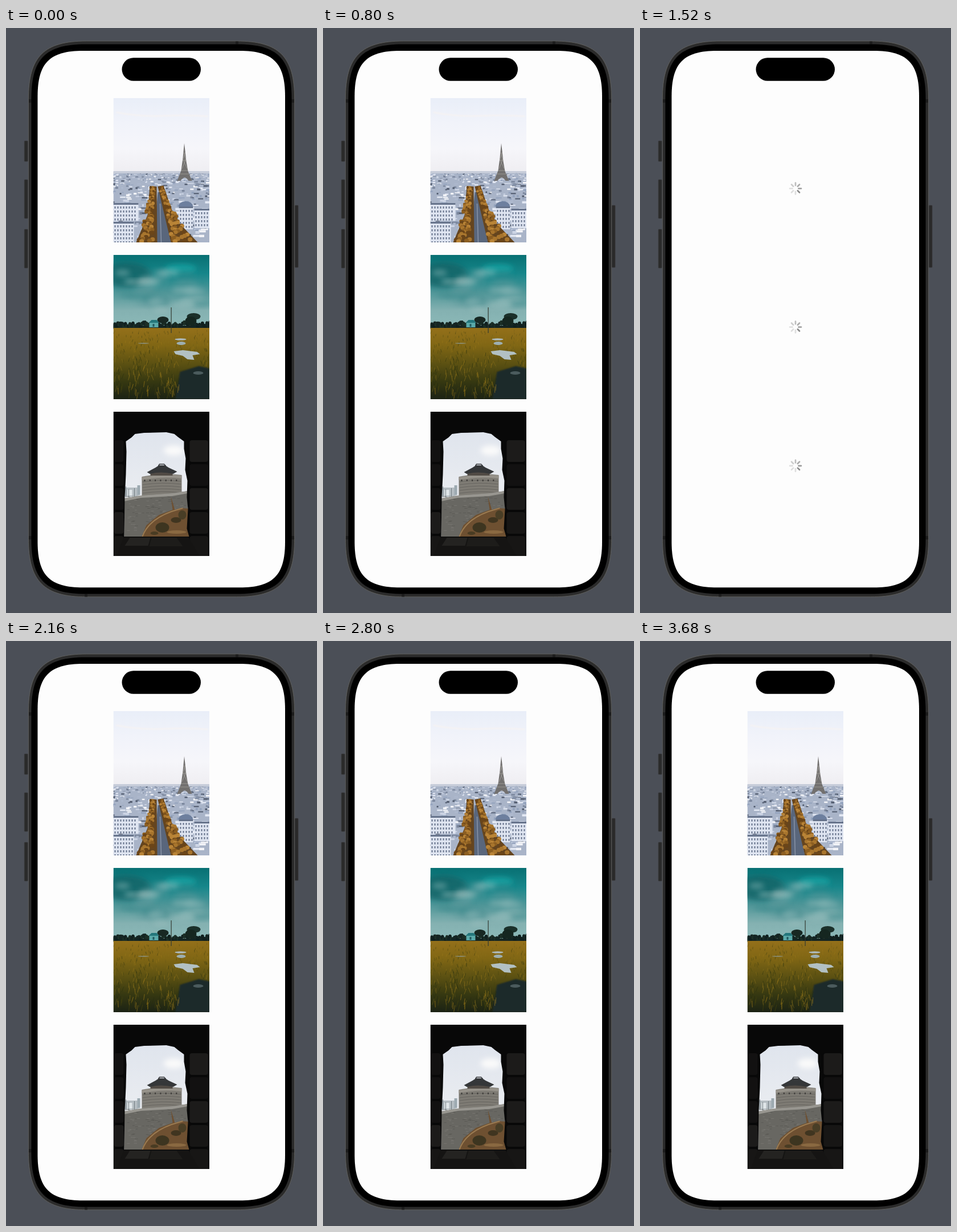
An HTML page for the animation above (3.76 s loop, 546 by 1026 pixels).

```html
<!DOCTYPE html>
<html lang="en">
<head>
<meta charset="utf-8">
<title>Loading photos</title>
<style>
html, body { margin: 0; width: 100%; height: 100%; overflow: hidden; background: #4b4f57; }
svg { display: block; width: 100%; height: 100%; }
</style>
</head>
<body>
<svg id="stage" viewBox="0 0 546 1026">
  <defs>
    <clipPath id="card"><rect width="168.5" height="253"/></clipPath>
    <filter id="soft" x="-50%" y="-50%" width="200%" height="200%"><feGaussianBlur stdDeviation="5"/></filter>
    <filter id="haze" x="-50%" y="-50%" width="200%" height="200%"><feGaussianBlur stdDeviation="1.2"/></filter>
  </defs>
  <rect width="546" height="1026" fill="#4b4f57"/>
  <g id="phone"></g>
  <g id="photos"></g>
  <g id="spinners"></g>
</svg>
<script>
const LOOP = 3760, HIDE = 1200, SHOW = 1840, STEP = 100, SPOKES = 8;
const $ = id => document.getElementById(id);

let seed = 7;
const rnd = (a = 0, b = 1) => {
  seed = (seed * 16807) % 2147483647;
  return a + (b - a) * seed / 2147483647;
};
const pick = list => list[Math.floor(rnd(0, list.length))];
const repeat = (n, make) => Array.from({ length: n }, (_, i) => make(i)).join('');
const rect = (x, y, w, h, fill, more = '') =>
  `<rect x="${x}" y="${y}" width="${w}" height="${h}" fill="${fill}" ${more}/>`;
const path = (d, fill, more = '') => `<path d="${d}" fill="${fill}" ${more}/>`;
const oval = (x, y, rx, ry, fill, more = '') =>
  `<ellipse cx="${x}" cy="${y}" rx="${rx}" ry="${ry}" fill="${fill}" ${more}/>`;
const gradient = (id, ...colors) =>
  `<linearGradient id="${id}" x2="0" y2="1">` + colors.map((c, i) =>
    `<stop offset="${i / (colors.length - 1)}" stop-color="${c}"/>`).join('') + '</linearGradient>';

// Rounded box with smooth, continuous corners
function smoothBox(x, y, w, h, r) {
  const c = r * 0.265, R = x + w, B = y + h;
  return `M${x} ${y + r}C${x} ${y + c} ${x + c} ${y} ${x + r} ${y}H${R - r}` +
    `C${R - c} ${y} ${R} ${y + c} ${R} ${y + r}V${B - r}` +
    `C${R} ${B - c} ${R - c} ${B} ${R - r} ${B}H${x + r}` +
    `C${x + c} ${B} ${x} ${B - c} ${x} ${B - r}Z`;
}

function phone() {
  const button = (x, y, h) => rect(x, y, 6, h, '#2a2a2a', 'rx="1" stroke="#3a3b3d" stroke-width=".7"');
  const band = (x, y, w, h) => rect(x, y, w, h, '#1d1d1d');
  return button(32.3, 198, 36) + button(32.3, 266, 68) + button(32.3, 353, 68) + button(507, 311, 109) +
    path(smoothBox(39.4, 22.9, 467.2, 974.8, 102), '#2b2b2b', 'stroke="#62625f" stroke-width=".9"') +
    band(40, 125, 5, 6) + band(501, 125, 5, 6) + band(40, 891, 5, 6) + band(501, 891, 5, 6) +
    band(403, 23.5, 5, 5) + band(138, 992.5, 5, 5) +
    path(smoothBox(44.5, 28.5, 457, 964, 95), '#000') +
    path(smoothBox(55.5, 40, 434.5, 941.3, 80), '#fdfdfd') +
    rect(203.5, 52.2, 138.5, 40.6, '#000', 'rx="20.3"');
}

function city() {
  const roofs = ['#e4e9f4', '#cdd5e5', '#aeb9ce', '#7b879d', '#535d70', '#f3f4f8', '#94a3bd'];
  const leaves = ['#8c5e21', '#a8752d', '#6b4518', '#b98437'];
  const houses = repeat(520, i => {
    const k = i / 520, y = 131 + 115 * k * k, s = 1 + k * 3;
    return rect(rnd(-5, 168), y + rnd(0, 3), s * rnd(1, 3.6), s * rnd(0.5, 1.5), pick(roofs));
  });
  const trees = (x0, x1, w0, w1) => repeat(90, i => {
    const k = i / 89, w = w0 + (w1 - w0) * k * k;
    return oval(x0 + (x1 - x0) * k + rnd(-w, w), 156 + 95 * k, 2.2 + 2 * k, 2 + 1.8 * k, pick(leaves));
  });
  const block = (x, y, w, h) => rect(x, y, w, h, '#dfe5f1') + rect(x, y, w, 3, '#66738b') +
    repeat(Math.floor(h / 7), r => repeat(Math.floor(w / 5), c =>
      rect(x + 2 + c * 5, y + 6 + r * 7, 2, 3.6, '#64718a')));
  return gradient('citySky', '#e9eef8', '#f1f3fa', '#f6f6fa', '#eeedf1') +
    rect(0, 0, 169, 133, 'url(#citySky)') +
    path('M5 25Q50 33 90 31T166 32', 'none', 'stroke="#f7f3f1" stroke-width="2" filter="url(#haze)"') +
    rect(0, 129, 169, 124, '#a9b4c8') + rect(0, 128, 169, 4, '#c6ccd9') + houses +
    block(0, 184, 44, 31) + block(0, 217, 36, 36) + block(115, 190, 25, 40) + block(142, 194, 27, 34) +
    path('M114 190Q116 181 127 181Q138 181 140 190Z', '#6d7f9e') +
    path('M78 165H83L101 253H70Z', '#59667c') + path('M82 185L84 253', 'none', 'stroke="#8994a7" stroke-width="1.5"') +
    path('M64 154L76 155L77 253H40L60 205Z', '#65451f') + path('M78 155L88 153L107 210L148 253H101Z', '#65451f') +
    trees(69, 56, 4, 14) + trees(83, 121, 3, 19) +
    path('M124.5 79L126 92L128 111L131 128L138 145H132Q125 134 118 145H112L119 127L122 105L123.2 92Z', '#72706f') +
    path('M119 127H131M117 133H133M121.5 109H128M123.5 95L127 108L120.5 124M126 95L122 108L130 124',
      'none', 'stroke="#aaa6a2" stroke-width=".7"');
}

function meadow() {
  const clouds = repeat(24, () => oval(rnd(10, 165), rnd(25, 106), rnd(10, 27), rnd(4, 9),
    pick(['#86b5b5', '#609a9c', '#a4c3c1', '#39878a']), 'opacity=".5" filter="url(#soft)"'));
  const bush = repeat(65, i => oval(i * 2.65, rnd(119, 126), 3, rnd(3, 5), pick(['#142523', '#1b2e26', '#10201f'])));
  const grass = repeat(420, i => {
    const k = i / 420, x = rnd(0, 168), y = 134 + 119 * k;
    if (x > 116 && y > 196) return '';
    return path(`M${x} ${y}l${rnd(-4, 4) * (k + .3)} ${-3 - 9 * k}`, 'none',
      `stroke="${pick(['#8a701b', '#a07c1a', '#44430f', '#29300f', '#64581a'])}" stroke-width="${.6 + .5 * k}" opacity=".65"`);
  });
  return gradient('meadowSky', '#087073', '#16868a', '#4f9698', '#84b1b1', '#8dbab9') +
    gradient('field', '#94701a', '#806614', '#5c5112', '#363811', '#1b2214') +
    rect(0, 0, 169, 130, 'url(#meadowSky)') +
    oval(22, 35, 45, 22, '#176064', 'opacity=".75" filter="url(#soft)"') +
    oval(118, 24, 28, 8, '#13a4a4', 'opacity=".8" filter="url(#soft)"') + clouds +
    rect(0, 124, 169, 6, '#172521') + bush +
    oval(141, 108, 12, 6, '#1b302a') + oval(87, 114, 10, 6, '#182823') + oval(136, 116, 10, 8, '#152620') +
    rect(0, 128, 169, 125, 'url(#field)') +
    path('M63 119L67 115H75L79 119V127H63Z', '#5baaaa') + path('M62 119L67 114H76L80 119Z', '#24777c') +
    rect(69, 121, 3, 5, '#225b61') +
    path('M117 205L150 195L169 199V253H109Z', '#1c292c', 'filter="url(#haze)"') + grass +
    oval(118, 148, 10, 1.8, '#aebabb') + oval(119, 155, 8, 3, '#9daeb0') + oval(53, 155, 10, .8, '#8e9789') +
    path('M106 169L122 167L147 170L152 174L139 176L142 184L130 183L122 177L109 174Z', '#b2c0c3') +
    oval(149, 207, 9, 3, '#6b7d81', 'opacity=".6"') +
    rect(101, 92, 1.2, 45, '#343b31');
}

function gate() {
  const masonry = repeat(140, () => {
    const x = rnd(22, 128), y = rnd(147, 212);
    return rect(x, y, rnd(3, 6), .7, pick(['#494845', '#8b8984']), 'opacity=".6"');
  });
  const stones = (x, w) => repeat(5, i => rect(x, 50 + i * 42, w, 38, pick(['#171615', '#1c1b1a', '#121111']), 'rx="4"'));
  const opening = 'M19 219L20 150L22 110L23 70L22 52L32 45L38 39L54 37L93 36L107 39L113 44L124 52L124 65' +
    'L127 82L126 102L130 121L129 150L131 171L129 205L133 219Z';
  return gradient('gateSky', '#dce2ec', '#e8ebf0', '#f1f1f1') +
    rect(0, 0, 169, 253, 'url(#gateSky)') +
    oval(106, 68, 18, 9, '#fafafa', 'filter="url(#soft)"') +
    rect(19, 133, 25, 16, '#b5bdc2') + rect(25, 137, 8, 10, '#dfe5e8') + rect(42, 129, 5, 17, '#9daab1') +
    path('M22 131V150M27 136V150M37 134V150', 'none', 'stroke="#606a70" stroke-width=".8"') +
    path('M50 114Q84 107 120 111V145L50 148Z', '#7e7b74') +
    path('M50 115Q84 108 120 112V117Q84 113 50 120Z', '#96928a') +
    repeat(7, i => rect(54 + i * 9.3, 119, 2, 3, '#3b3937')) +
    repeat(5, i => path(`M51 ${123 + i * 5}Q85 ${118 + i * 5} 119 ${122 + i * 5}`, 'none',
      'stroke="#55534f" stroke-width=".7" opacity=".8"')) +
    path('M65 106H104V112H65Z', '#514b45') +
    path('M59 106L74 98L80 94H91L97 98L112 105L105 109Q84 104 64 109Z', '#353739') +
    path('M79 95L81 92H89L92 95', 'none', 'stroke="#303235" stroke-width="1.5"') +
    path('M19 152L48 147L103 143L131 139V225H19Z', '#686762') + masonry +
    path('M19 152L48 147L103 143L131 139V143L103 148L48 151L19 157Z', '#989690') +
    path('M101 149L104 172L80 181L58 199L49 221H134V170L119 169L108 172Z', '#6e5031') +
    path('M51 219Q61 190 102 175L122 169', 'none', 'stroke="#9b7b52" stroke-width="2"') +
    oval(86, 203, 12, 9, '#3d3520') + oval(110, 190, 9, 5, '#403520') + oval(121, 181, 7, 8, '#493e26') +
    oval(111, 211, 17, 3, '#8a6941') + oval(72, 213, 7, 3, '#493c23') +
    path('M0 0H169V253H0Z' + opening, '#080808', 'fill-rule="evenodd"') +
    stones(1, 17) + stones(134, 32) +
    path('M18 220H132L151 253H6Z', '#151413') + path('M29 221H65L61 235H20Z', '#242321') +
    path('M67 221H111L122 236H63Z', '#1d1c1a');
}

const photo = (y, art) => `<g transform="translate(188.5 ${y})" clip-path="url(#card)">${art}</g>`;
const spinner = y => `<g transform="translate(273 ${y})">` + repeat(SPOKES, i =>
  `<path class="spoke" d="M0-5.4V-9.9" transform="rotate(${i * 45})" stroke-width="2.7" stroke-linecap="round"/>`) + '</g>';

$('phone').innerHTML = phone();
$('photos').innerHTML = photo(123, city()) + photo(398, meadow()) + photo(673, gate());
$('spinners').innerHTML = [281.5, 524.5, 767.8].map(spinner).join('');
const spokes = [...document.querySelectorAll('.spoke')];

function draw(t) {
  const loading = t >= HIDE && t < SHOW;
  $('photos').style.display = loading ? 'none' : '';
  $('spinners').style.display = loading ? '' : 'none';
  if (!loading) return;
  const head = Math.floor((t - HIDE) / STEP);
  spokes.forEach((spoke, i) => {
    const age = (head - i % SPOKES + 2 * SPOKES) % SPOKES;
    const gray = Math.round(Math.min(222, 138 + age * 17));
    spoke.setAttribute('stroke', `rgb(${gray},${gray},${gray})`);
  });
}

const start = performance.now();
function tick() {
  draw((performance.now() - start) % LOOP);
  requestAnimationFrame(tick);
}
tick();
</script>
</body>
</html>
```
